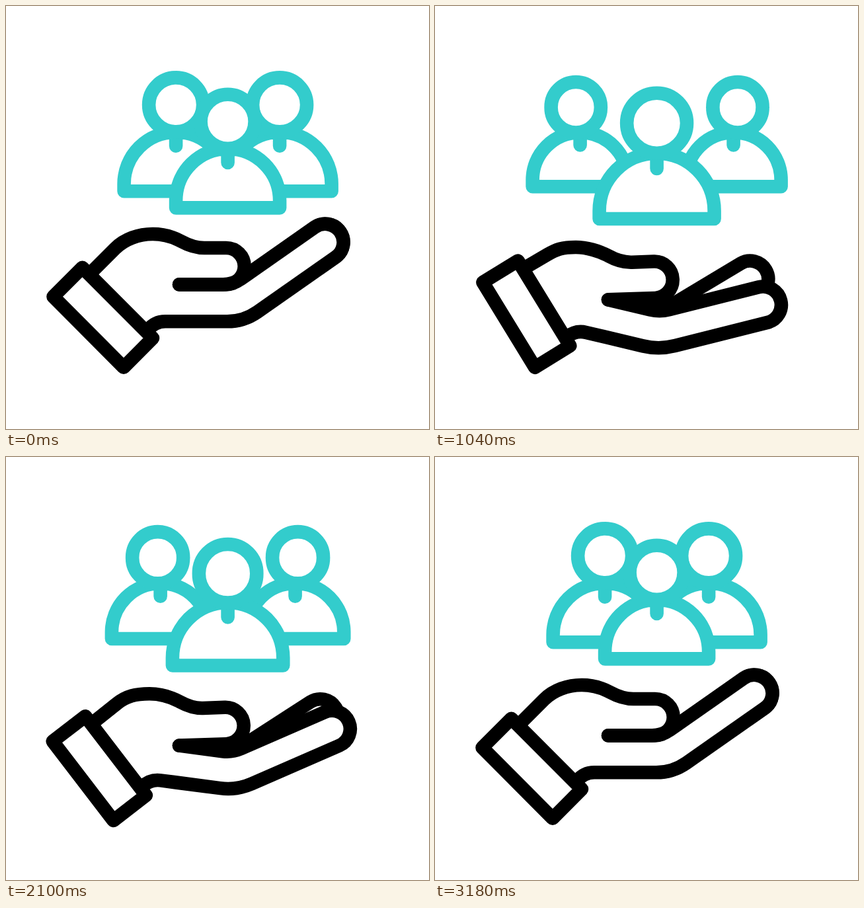
An HTML page for the animation above (3.3 s loop, 640x640 px).

```html
<!DOCTYPE html>
<html lang="en">
<head>
<meta charset="utf-8">
<title>People above an open hand</title>
<style>
  html, body { margin: 0; width: 100%; height: 100%; overflow: hidden; background: #fff; }
  svg { display: block; width: 100vw; height: 100vh; }
  path { fill: #fff; stroke: #000; stroke-width: 20.6; stroke-linecap: round; stroke-linejoin: round; }
  .line { fill: none; }
  .people path { stroke: #33cccc; }
</style>
</head>
<body>
<svg viewBox="0 0 640 640">
  <path id="backFinger" class="line"/>
  <path id="palm"/>
  <path id="thumb" class="line"/>
  <path id="cuff"/>
  <g class="people">
    <path id="leftBody"/><path id="leftHead"/>
    <path id="rightBody"/><path id="rightHead"/>
    <path id="midBody"/><path id="midHead"/>
  </g>
</svg>
<script>
const LOOP = 3300, STEP = 20, RAD = Math.PI / 180;

// time, palm turn, hand drop, finger turn, thumb turn,
// back fingertip dx, dy, middle growth, side growth, side spread
const KEYS = [
  [0, 0, 0, 0, 0, 0, 0, 0, 0, 0],
  [380, 4.8, 9, 6.3, -1, -7, 22.5, 0.036, -0.034, 13],
  [1040, 13.4, 23, 19.7, -2, -6, 56, 0.108, -0.083, 37.5],
  [1620, 13.9, 25.5, 20.2, -2, -6, 57, 0.114, -0.089, 43],
  [1730, 14.3, 26.5, 20.8, -2, -6, 58, 0.122, -0.098, 47.5],
  [1880, 13, 25, 19.1, -2, -6, 56.5, 0.113, -0.09, 42],
  [2320, 1.3, 6, 1.6, -2, -9, 10, 0.02, -0.03, 5.5],
  [2700, -4, 3.4, -5.5, -3.3, -7.7, -15.4, 0, 0, -6.5],
  [2840, -1.9, 2, -2.5, -2.4, -3.5, -6.5, 0, 0, -3],
  [3180, 0, 0, 0, 0, 0, 0, 0, 0, 0]
];

const slope = (i, c) => (KEYS[i + 1][c] - KEYS[i][c]) / (KEYS[i + 1][0] - KEYS[i][0]);

// Tangent that never overshoots a key
function tangent(i, c) {
  if (i === 0 || i === KEYS.length - 1) return 0;
  const a = slope(i - 1, c), b = slope(i, c);
  return a * b <= 0 ? 0 : 2 * a * b / (a + b);
}

function pose(time) {
  const last = KEYS.length - 1;
  if (time >= KEYS[last][0]) return KEYS[last].slice(1);
  let i = 0;
  while (time >= KEYS[i + 1][0]) i++;
  const h = KEYS[i + 1][0] - KEYS[i][0], t = (time - KEYS[i][0]) / h;
  const t2 = t * t, t3 = t2 * t;
  return KEYS[i].slice(1).map((v, k) => {
    const c = k + 1;
    return v * (2 * t3 - 3 * t2 + 1) + KEYS[i + 1][c] * (3 * t2 - 2 * t3)
      + h * (tangent(i, c) * (t3 - 2 * t2 + t) + tangent(i + 1, c) * (t3 - t2));
  });
}

const dir = deg => [Math.cos(deg * RAD), Math.sin(deg * RAD)];
const move = (p, v, n) => [p[0] + v[0] * n, p[1] + v[1] * n];
const d = (...parts) => parts.map(p => Array.isArray(p) ? p.map(n => n.toFixed(2)).join(' ') : p).join(' ');
const set = (id, path) => document.getElementById(id).setAttribute('d', path);

// Crossing of the line p + v with the line q + w
function meet(p, v, q, w) {
  const n = ((q[0] - p[0]) * w[1] - (q[1] - p[1]) * w[0]) / (v[0] * w[1] - v[1] * w[0]);
  return move(p, v, n);
}

// Turns rest points about the crease of the thumb, then drops them
function turner(deg, drop) {
  const [c, s] = dir(deg);
  return (x, y) => {
    const a = x - 262, b = y - 421.4;
    return [262 + a * c - b * s, 421.4 + drop + a * s + b * c];
  };
}

const TIP = 27.6, ARC = `A${TIP} ${TIP} 0 0 1`;

function drawHand([turn, drop, bend, thumbTurn, bx, by]) {
  const palm = turner(turn, drop), thumb = turner(thumbTurn, drop);
  const along = dir(turn);

  const reach = 31.5 - bend;
  const tip = move(palm(333, 449.3), dir(-reach), 175.8);
  const out = dir(-(reach * 1.06 + 1.6)), down = [-out[1], out[0]];
  const upper = move(tip, down, -TIP), lower = move(tip, down, TIP);
  const crease = palm(262, 421.4);
  const inner = meet(crease, along, upper, out);
  const outer = meet(palm(333, 477.3), along, lower, out);
  set('palm', d('M', crease, 'L', move(inner, along, -15), 'Q', inner, move(inner, out, 15),
    'L', upper, ARC, lower, 'L', move(outer, out, 25), 'Q', outer, move(outer, along, -25),
    'L', palm(241, 477.3), 'Q', palm(225, 477.3), palm(215, 490)));

  const back = [483 + bx, 357 + by];
  const dx = back[0] - inner[0], dy = back[1] - inner[1];
  const lean = Math.atan2(dy, dx) - Math.asin(TIP / Math.hypot(dx, dy));
  const bv = dir(lean / RAD), bn = [-bv[1], bv[0]];
  const low = move(back, bn, TIP);
  set('backFinger', d('M', inner, 'L', move(back, bn, -TIP), ARC, low, 'L', move(low, bv, -30)));

  const open = turn / 13.4;
  const wrist = palm(130, 402);
  const rise = [165 + 5 * open, 367 + 0.4 * drop];
  const hump = [222 - 9 * open, 345 + 0.87 * drop];
  const fall = [265 - 3 * open, 356 + 0.95 * drop];
  const lead = [rise[0] - wrist[0], rise[1] - wrist[1]];
  set('thumb', d('M', wrist, 'L', rise,
    'C', move(rise, lead, 0.42), move(hump, [-1, 0], 21), hump,
    'C', move(hump, [1, 0], 16), move(fall, [-13, -7], 1), fall,
    'C', move(fall, [11, 6], 1), thumb(288, 366), thumb(300, 366),
    'L', thumb(333, 366), ARC, thumb(333, 421.4), 'L', thumb(262, 421.4)));

  set('cuff', d('M', palm(71.5, 439.7), 'L', palm(115.5, 395.7), palm(222, 502.5), palm(178, 546.7), 'Z'));
}

function drawPerson(name, headX, headY, bodyX, base, k) {
  const r = 41 * k, half = 78.5 * k, side = 11 * k;
  set(name + 'Head', d('M', [headX - r, headY], 'a', [r, r], '0 1 0', [2 * r, 0],
    'a', [r, r], '0 1 0', [-2 * r, 0], 'Z'));
  set(name + 'Body', d('M', [bodyX - half, base], 'v', [-side], 'a', [half, half], '0 0 1', [2 * half, 0],
    'v', [side], 'Z M', [bodyX, base - 89.5 * k], 'v', [21 * k]));
}

function drawPeople(grow, sideGrow, spread) {
  const mid = 335.6, k = 1 + grow, sk = 1 + sideGrow;
  const midY = y => 152 + (y - 152) * k;
  const sideY = y => 196 + (y - 196) * sk;
  for (const [name, s] of [['left', -1], ['right', 1]]) {
    drawPerson(name, mid + s * (78.5 + 1.17 * spread), sideY(149.4),
      mid + s * (78.5 + spread), sideY(280.2), sk);
  }
  drawPerson('mid', mid, midY(174.8), mid, midY(305.4), k);
}

function draw(time) {
  const p = pose(time);
  drawHand(p);
  drawPeople(p[6], p[7], p[8]);
}

const start = performance.now();
function frame() {
  const time = (performance.now() - start) % LOOP;
  draw(Math.floor(time / STEP) * STEP);
  requestAnimationFrame(frame);
}
frame();
</script>
</body>
</html>
```
